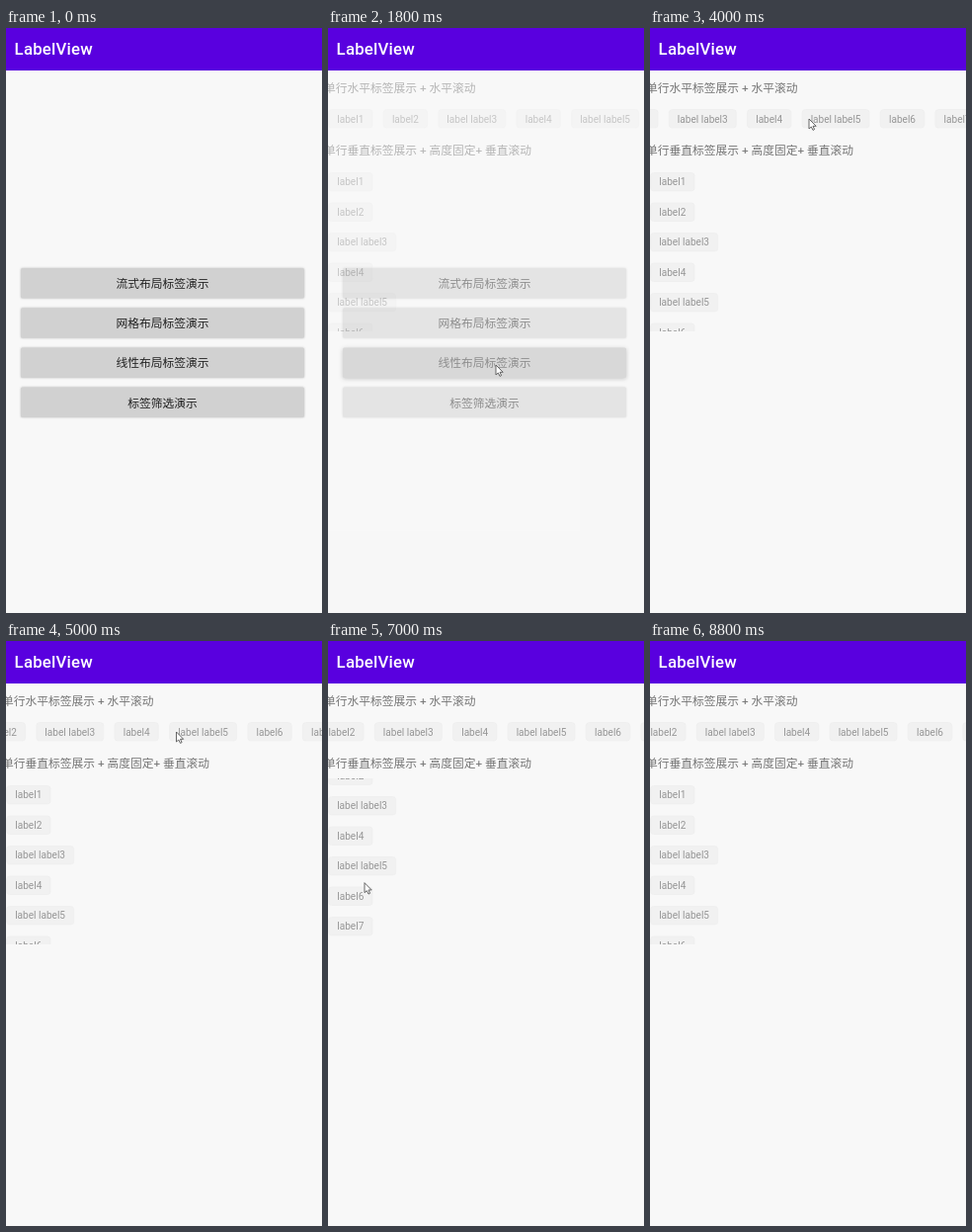
Animation, 320 px wide and 592 px high, one loop 9.8 s. Source, as an HTML page:

```html
<!DOCTYPE html>
<html lang="zh-CN">
<head>
<meta charset="utf-8">
<title>LabelView</title>
<style>
  html, body { margin: 0; width: 100%; height: 100%; overflow: hidden; background: #f8f8f8; }
  svg { display: block; width: 320px; height: 592px; }
  text { font-family: Roboto, "Noto Sans CJK SC", "Noto Sans CJK", sans-serif; }
  .title { font-size: 16.8px; font-weight: 500; letter-spacing: .2px; fill: #fff; }
  .button rect { fill: #d1d1d1; filter: drop-shadow(0 .5px .8px rgba(0, 0, 0, .22)); }
  .button.pressed rect { fill: #b9b9b9; filter: drop-shadow(0 1.5px 2px rgba(0, 0, 0, .4)); }
  .button text { font-size: 11.75px; fill: #222; text-anchor: middle; }
  .heading { font-size: 11.75px; fill: #757575; }
  .label rect { fill: #f1f1f1; stroke: #ececec; stroke-width: .6; }
  .label text { font-size: 10.07px; fill: #969696; text-anchor: middle; }
</style>
</head>
<body>
<svg viewBox="0 0 320 592">
  <defs>
    <clipPath id="viewport"><rect y="139" width="320" height="168"/></clipPath>
  </defs>
  <rect width="320" height="592" fill="#f8f8f8"/>
  <g id="menu"></g>
  <g id="demo">
    <rect y="43" width="320" height="549" fill="#f8f8f8"/>
    <text class="heading" x="-4" y="64.5">单行水平标签展示 + 水平滚动</text>
    <text class="heading" x="-4" y="128.3">单行垂直标签展示 + 高度固定+ 垂直滚动</text>
    <g id="row"></g>
    <g clip-path="url(#viewport)"><g id="column"></g></g>
  </g>
  <rect width="320" height="43" fill="#5900df"/>
  <text class="title" x="8.6" y="26.5">LabelView</text>
  <path id="cursor" d="M0 0V10L2.3 8L4 11.4L5.6 10.6L4 7.3H7.2Z" fill="#fff" stroke="#555" stroke-width=".9"/>
</svg>
<script>
const LOOP = 9800, STEP = 200;
const $ = id => document.getElementById(id);

// Tracks are lists of [time, ...values].
const cursorTrack = [
  [800, 250, 560], [1400, 170, 341], [1800, 170, 341], [2400, 145, 276],
  [3000, 253.5, 92], [3200, 253.5, 92], [4000, 161, 92], [4400, 123, 92],
  [5200, 189, 92], [6000, 138, 135], [6800, 38, 290], [7400, 35, 154],
  [7800, 35, 154], [8600, 35, 340]
];
const rowTrack = [[3200, 0], [4000, 92.5], [4400, 130.5], [5200, 64.5]];
const columnTrack = [[6800, 0], [7400, 150], [7600, 183.2], [7800, 183.2], [8600, 0]];

function sample(track, time) {
  const next = track.findIndex(key => key[0] > time);
  if (next === 0) return track[0].slice(1);
  if (next < 0) return track[track.length - 1].slice(1);
  const [start, ...from] = track[next - 1];
  const [end, ...to] = track[next];
  const part = (time - start) / (end - start);
  return from.map((value, i) => value + (to[i] - value) * part);
}

function label(lines, x, y, width) {
  const height = 18.5 + (lines.length - 1) * 11.7;
  const texts = lines.map((line, i) =>
    `<text x="${x + width / 2}" y="${y + 12.9 + i * 11.7}">${line}</text>`);
  return `<g class="label"><rect x="${x}" y="${y}" width="${width}" height="${height}" rx="3"/>${texts.join("")}</g>`;
}

function buildMenu() {
  const names = ["流式布局标签演示", "网格布局标签演示", "线性布局标签演示", "标签筛选演示"];
  $("menu").innerHTML = names.map((name, i) => `<g class="button" transform="translate(0 ${243 + 40.2 * i})">
    <rect x="15" width="287" height="30.5" rx="1.5"/><text x="158.5" y="20">${name}</text></g>`).join("");
}

function buildLabels() {
  let x = .6, y = 146.5, row = "", column = "";
  for (let i = 1; i <= 11; i++) {
    const long = i === 3 || i === 5 || i === 10;
    const width = long ? 68 : i > 9 ? 50 : 44.4;
    const name = (long ? "label label" : "label") + i;
    const rowWidth = i === 10 ? 73.6 : width;
    row += label([name], x, 82.6, rowWidth);
    column += label(i === 10 ? name.split(" ") : [name], .6, y, width);
    x += rowWidth + 11.2;
    y += i === 10 ? 42.2 : 30.5;
  }
  $("row").innerHTML = row;
  $("column").innerHTML = column;
}

function move(id, x, y) {
  $(id).setAttribute("transform", `translate(${x} ${y})`);
}

function draw(now) {
  const time = Math.floor(now % LOOP / STEP) * STEP;
  $("demo").setAttribute("opacity", time < 1800 ? 0 : time < 2000 ? .5 : 1);
  $("menu").children[2].classList.toggle("pressed", time >= 1600 && time < 2000);
  move("row", -sample(rowTrack, time)[0], 0);
  move("column", 0, -sample(columnTrack, time)[0]);
  move("cursor", ...sample(cursorTrack, time));
  $("cursor").style.display = time >= 800 && time < 8800 ? "" : "none";
}

buildMenu();
buildLabels();
const begin = performance.now();
function tick() {
  draw(performance.now() - begin);
  requestAnimationFrame(tick);
}
tick();
</script>
</body>
</html>
```
